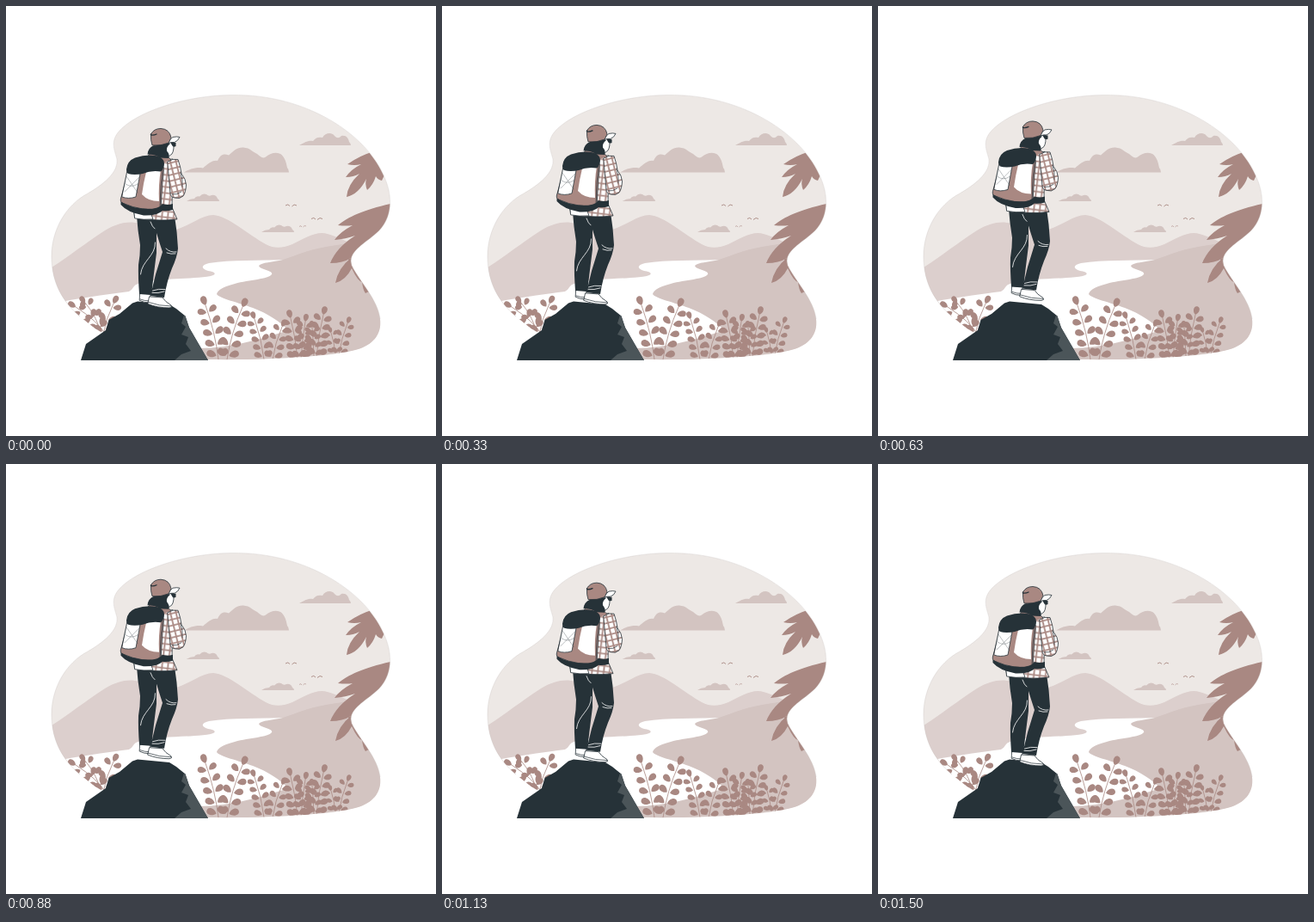
Recreate the animation shown at these times as an HTML page. Size 500x500 px, loop 1540 ms.

```html
<!DOCTYPE html>
<html lang="en">
<head>
<meta charset="utf-8">
<title>Hiker</title>
<style>
html, body { margin: 0; width: 100%; height: 100%; overflow: hidden; background: #fff; }
svg { display: block; width: 100vw; height: 100vh; }
.sky { fill: #ede8e5; }
.far { fill: #dccfcd; }
.near { fill: #d3c4c1; }
.leaf { fill: #a98882; }
.ink { fill: #263238; }
.white { fill: #fff; }
.edge { stroke: #263238; stroke-width: .8; stroke-linejoin: round; stroke-linecap: round; }
.line { fill: none; stroke: #263238; stroke-width: .7; stroke-linecap: round; }
.seam { fill: none; stroke: #fff; stroke-width: .8; stroke-linecap: round; }
.stem { fill: none; stroke: #a98882; stroke-width: .8; }
.bird { fill: none; stroke: #a98882; stroke-width: .9; }
</style>
</head>
<body>
<svg viewBox="0 0 500 500">
  <defs>
    <path id="blob" d="M262 103.500C208 104 152 123 132 145C121 157 126 167 129 178C131 194 112 208 95 218C70 231 53 260 53 291C53 322 66 344 86 361C110 381 150 411 236 411C310 412 382 407 408 399.500C429 393 437 380 435 364C432 341 413 323 402 302C396 285 420 275 434 261C449 245 450 222 440 199C420 150 350 102 262 103.500Z"/>
    <clipPath id="clip"><use href="#blob"/></clipPath>
    <pattern id="plaid" width="6.8" height="7" patternUnits="userSpaceOnUse" patternTransform="translate(181 180) rotate(7)">
      <rect width="6.8" height="7" fill="#fff"/>
      <path d="M0 1.6H6.8M1.4 0V7" stroke="#a98882" stroke-width="1.8"/>
    </pattern>
    <pattern id="sleeve" width="6.4" height="6.8" patternUnits="userSpaceOnUse" patternTransform="translate(189 181) rotate(-14)">
      <rect width="6.4" height="6.8" fill="#fff"/>
      <path d="M0 2H6.4M2 0V6.800" stroke="#a98882" stroke-width="1.8"/>
    </pattern>
  </defs>

  <g clip-path="url(#clip)">
    <use href="#blob" class="sky"/>
    <path class="far" d="M50 306C72 292 92 276 112 263C124 255 138 250 150 252C166 254 182 263 198 260C214 255 228 243 241 243C258 244 282 266 302 277C313 283 323 281 333 277C345 271 357 264 367 264C377 264 388 271 400 275V320H240L140 350H50Z"/>
    <path class="white" d="M50 347C82 340 112 336 143 332C150 328 146 325 156 322C180 316 216 318 238 314C246 312 243 309 235 308C226 305 227 301 236 299C262 295 294 296 330 295L340 380L240 415H50Z"/>
    <path class="near" d="M450 262C420 272 392 277 372 280C348 284 336 291 322 295C310 298 297 298 294 302C295 307 311 307 309 312C305 318 283 318 266 323C254 326 246 330 245 335C248 340 271 345 287 351C305 358 319 367 328 377C304 385 281 392 253 396Q238 398 225 398V415H450Z"/>
    <path class="near" d="M207 193.500C213 190 221 187 229 188.500C235 184 239 179 246 180C249 173 253 171 259 173.500C265 168 269 164 276 164.500C284 165 287 170 292 172C296 175 298 178 302 175.500C308 170 317 169 321 173.500C325 178 326 183 327 188Q329 190 329 193.500Z"/>
    <path class="near" d="M341 162C347 159 351 156 357 157C360 153 363 152 368 153C371 148 378 146 382 151C385 154 387 154 390 151C396 150 398 154 399 158Q401 160 401 162Z"/>
    <path id="puff" class="near" d="M210 227Q214 224 219 224Q221 220.500 225 221.500Q229 217 233 219Q236 222 239 220Q244 219 246 224Q248 225 248 227Z"/>
    <use href="#puff" x="87" y="36"/>
    <path class="bird" d="M325 232Q328 229.500 330 232.500M332.500 233Q335 229.500 338 232M355 247.500Q358 245 360 248M362 248.500Q365 245 368 247.500"/>
    <path class="bird" opacity=".65" d="M341 256.500Q343 254.500 344 257M345.500 257Q347 254.500 349 256"/>
    <path class="leaf" d="M428 169Q411 174 397 184Q405 186 413 184Q401 190 395 199Q404 199 411 195Q397 208 396 222Q410 219 419 201Q417 207 420 214Q427 208 430 198Q432 202 437 203Q440 198 442 190Z"/>
    <path class="leaf" d="M452 229C418 236 398 245 386 255Q396 256 403 255Q388 263 382 272Q395 271 406 267Q384 281 377 299Q392 299 401 293Q386 305 383 322Q395 319 402 305L412 300L452 258Z"/>
    <path class="leaf" d="M398 294L402 305Q409 320 414 321Q415 330 418 334Q422 331 425 333L410 294Z"/>
    <g id="plants"></g>
  </g>
  <path fill="none" stroke="#c9c2c0" stroke-width=".4" d="M262 103.500C208 104 152 123 132 145C121 157 126 167 129 178C131 194 112 208 95 218C70 231 53 260 53 291C53 322 66 344 86 361M435 364C432 341 413 323 402 302C396 285 420 275 434 261C449 245 450 222 440 199C420 150 350 102 262 103.500"/>

  <path class="ink" d="M87 412L93 393L116 377L119.500 365L132 358L147 345.500L153 343.500L190 347L198 352L208.500 360.500L213 374L235 412Z"/>
  <path fill="#4b5559" d="M207 359.500L204 369L209 373L204 382L212 385L209 393L215 401L204 405L196 412H235L213 374L208.500 360.500Z"/>

  <g id="hiker">
    <path class="white edge" d="M156 334L168 335L167 345Q160 345 155.500 342.500Z"/>
    <path class="line" d="M156 341Q161 343 167 343"/>
    <path class="white edge" d="M167 338L182 339Q185 344 192 348Q194 350.500 190 351Q176 351 165 346.500Z"/>
    <path class="line" d="M165.500 344.500Q178 349 192 349"/>
    <path class="ink" d="M152 244L196 244Q199 262 200 282Q199 292 193 305Q187 320 184 339L168 337Q171 324 174 312Q178 299 182 286Q178 274 175 264L175 287Q172 310 169 336L155 335Q153.500 315 154 301Q156 290 156 278Q153 260 152 244Z"/>
    <path class="seam" d="M173.500 275C174 291 158 296 156.500 312M168 251Q170 257 173 259M186 282Q191 287 198 286M187 287Q192 289 197 288M170.500 331Q177 328.500 185 329.500M170 333.500Q177 334.500 184 332"/>
    <path class="edge" fill="url(#plaid)" d="M181 179L194 178L193 234L199 248Q174 251 150 246L149 240L178 234Z"/>
    <path class="white edge" d="M149 239L168 240L171 248Q160 249 150 247Z"/>
    <path class="leaf" d="M163 177L167 172L188 175L192 179L181 183Z"/>
    <path class="line" d="M163 177L167 172L188 175L192 179"/>
    <path class="edge" fill="url(#sleeve)" d="M188 181Q194 177 200 178.500Q203 187 204 195Q209 201 209.500 208Q209 217 206 221Q202 225 196 223Q191 222 191 218Z"/>
    <path class="line" d="M203 194Q206 202 205 210M193 219Q199 220 204 216"/>

    <path class="leaf edge" d="M143 191L183 187Q184 190 182 205L180 235Q160 240 135 229Q132 227 134 222Z"/>
    <path class="white edge" d="M141 193L156 195L151 222Q142 225 135 222Z"/>
    <path class="line" opacity=".45" d="M140 198L153 217M138 216L155 199M139 207Q146 212 153 207"/>
    <path class="white" d="M163 193L180 190Q177 208 178 227Q165 227 158 219Q160 205 163 193Z"/>
    <path class="line" d="M182 190Q179 211 179 235"/>
    <path class="ink" d="M133.500 227.500Q146 235.500 165 236Q178 236 182 230Q188 232 194 230V237Q187 239 182 238Q176 244 160 243.500Q141 240 133.500 231Z"/>
    <path class="ink" d="M140 190Q141 180 150 176.500Q164 172 176 174.500Q184 177 184 183Q184 189 180 192.500Q168 191 159 195Q149 197 142 195Q139.500 193 140 190Z"/>

    <path class="white edge" d="M185 159L194.500 158Q196 167 193 172Q190 176 184 176Z"/>
    <path class="ink" d="M172 160Q183 158 191 160Q186 164 187 168.500Q191 173 189 177L179 176.500Q173 172 164.500 172.500Q165 165 172 162Z"/>
    <path class="ink" d="M191 158.500L197.500 159L197.500 163Q194 165 192.500 161Z"/>
    <path class="leaf edge" d="M168.500 149Q172 142.500 180 142.500Q190 143 192 153L189.500 159Q180 163 170 162Q168 156 168.500 149Z"/>
    <path class="white edge" d="M189 159.500Q191 154 194 152.500Q199 151.500 202 152.500Q200 157 196 158.500Q192 158 189 159.500Z"/>
    <path class="line" d="M168.500 150Q172 150.500 175 149" style="stroke-width:1.3"/>
  </g>
</svg>
<script>
const PERIOD = 1540, LEAD = 32, LIFT = 9;
const svgEl = (name, cls, d) => {
  const el = document.createElementNS('http://www.w3.org/2000/svg', name);
  el.setAttribute('class', cls);
  el.setAttribute('d', d);
  return el;
};
const fix = v => v.toFixed(1);
const plants = document.getElementById('plants');

// A teardrop leaf of given length, pointing along the angle.
function leaf(x, y, angle, len) {
  const c = Math.cos(angle), s = Math.sin(angle), w = len * .45;
  const at = (u, v) => fix(x + u * c - v * s) + ' ' + fix(y + u * s + v * c);
  return `M${at(0, 0)}C${at(len * .3, -w)} ${at(len, -w)} ${at(len, 0)}C${at(len, w)} ${at(len * .3, w)} ${at(0, 0)}Z`;
}

// A curved stem with paired leaves and one at the tip.
function plant(x0, y0, x1, y1, pairs, len) {
  const mx = x0 + (x1 - x0) * .25, my = (y0 + y1) / 2;
  const pos = (a, m, b, u) => a * (1 - u) ** 2 + 2 * m * u * (1 - u) + b * u * u;
  let d = leaf(x1, y1, Math.atan2(y1 - my, x1 - mx), len);
  for (let i = 0; i < pairs; i++) {
    const u = .06 + .8 * i / (pairs - 1);
    const x = pos(x0, mx, x1, u), y = pos(y0, my, y1, u);
    const up = Math.atan2((my - y0) * (1 - u) + (y1 - my) * u, (mx - x0) * (1 - u) + (x1 - mx) * u);
    for (const side of [-1, 1]) {
      const a = up + side * 1.1;
      const sx = x + Math.cos(a) * 2, sy = y + Math.sin(a) * 2;
      d += leaf(sx, sy, a, len * (1.08 - .15 * u));
    }
  }
  plants.append(svgEl('path', 'stem', `M${x0} ${y0}Q${mx} ${my} ${x1} ${y1}`), svgEl('path', 'leaf', d));
}

[
  [117, 384, 81, 350, 4, 10], [109, 376, 92, 345, 3, 9], [113, 382, 125, 346, 3, 10],
  [247, 411, 232, 348, 5, 11], [257, 411, 275, 350, 5, 11],
  [300, 411, 289, 364, 5, 9], [310, 411, 321, 373, 4, 9],
  [339, 411, 331, 363, 5, 10], [343, 411, 348, 367, 5, 9],
  [361, 408, 369, 359, 5, 10], [358, 408, 356, 374, 4, 8],
  [383, 404, 378, 380, 3, 7], [387, 406, 397, 369, 4, 8]
].forEach(p => plant(...p));

const hiker = document.getElementById('hiker');
function draw(t) {
  const phase = (t % PERIOD + LEAD) / PERIOD * 2 * Math.PI;
  const y = -LIFT * (1 - Math.cos(phase)) / 2;
  hiker.setAttribute('transform', `translate(0 ${y.toFixed(2)})`);
}

let start;
function tick(now) {
  if (start === undefined) start = now;
  draw(now - start);
  requestAnimationFrame(tick);
}
draw(0);
requestAnimationFrame(tick);
</script>
</body>
</html>
```
